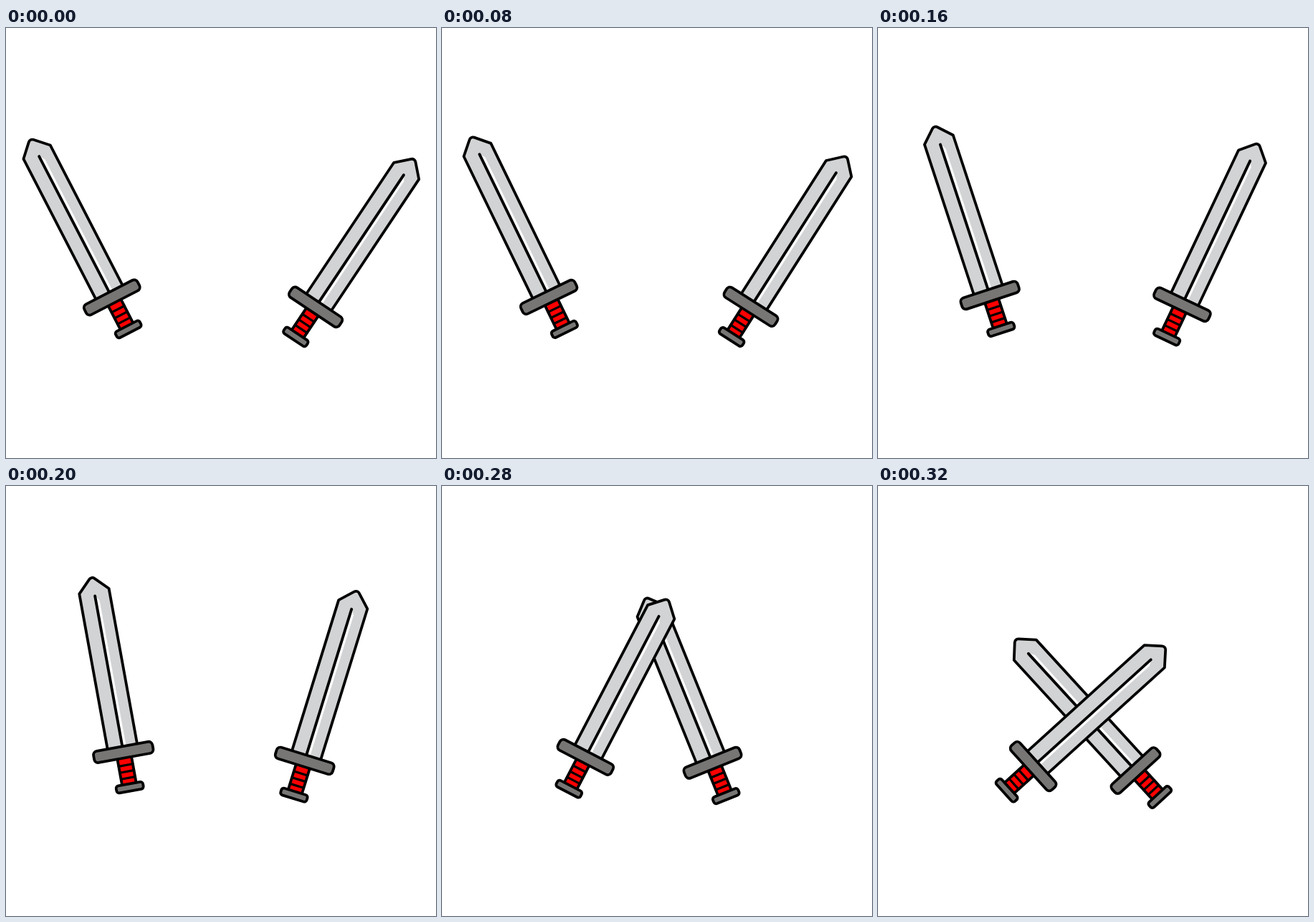
An HTML page with a canvas that plays this animation: 600 by 600 pixels, repeating every 1280 ms.

```html
<!DOCTYPE html>
<html lang="en">
<head>
<meta charset="utf-8">
<title>Crossing swords</title>
<style>
html, body { margin: 0; width: 100%; height: 100%; overflow: hidden; background: #fff; }
canvas { display: block; }
</style>
</head>
<body>
<canvas id="stage" width="600" height="600"></canvas>
<script>
const ctx = document.getElementById('stage').getContext('2d');
const LOOP = 1280, STEP = 40, HOLD = 40;

// Angles in degrees per step; the pommel drifts as the sword turns.
const rightSword = {
  angles: [33.7, 32.5, 29.6, 25.3, 17.2, 0.9, -22, -42.5],
  from: [404.3, 431], to: [393.3, 434]
};
const leftSword = {
  angles: [-27.3, -25.9, -23, -18.2, -10.3, 5.7, 27.5, 47.8],
  from: [170.7, 420.4], to: [179.6, 424.7]
};

function paint(fill, width = 3.8) {
  ctx.fillStyle = fill;
  ctx.fill();
  ctx.lineWidth = width;
  ctx.stroke();
}

function bar(halfWidth, top, height, radius, fill) {
  ctx.beginPath();
  ctx.roundRect(-halfWidth, top, halfWidth * 2, height, radius);
  paint(fill);
}

function line(x1, y1, x2, y2, width) {
  ctx.beginPath();
  ctx.moveTo(x1, y1);
  ctx.lineTo(x2, y2);
  ctx.lineWidth = width;
  ctx.stroke();
}

function blade() {
  ctx.beginPath();
  ctx.moveTo(-21, -50);
  ctx.lineTo(-21, -278.3);
  ctx.arcTo(0, -299.5, 21, -278.3, 5);
  ctx.lineTo(21, -278.3);
  ctx.lineTo(21, -50);
  paint('#d1d3d4');

  ctx.beginPath();
  ctx.moveTo(1, -271);
  ctx.lineTo(5.3, -264);
  ctx.lineTo(5.3, -50);
  ctx.lineTo(1, -50);
  ctx.fillStyle = '#fff';
  ctx.fill();
  line(0, -271.5, 0, -50, 3.9);
}

function hilt() {
  bar(10, -44, 40, 0, '#f00');
  for (let y = -31.6; y < -10; y += 9.1) line(-10, y, 10, y, 3.2);
  bar(19, -5, 10, 3.5, '#777675');
  bar(41.8, -58.2, 16.4, 5.5, '#777675');
}

function drawSword({ angles, from, to }, step) {
  const angle = angles[step];
  const p = (angle - angles[0]) / (angles[7] - angles[0]);
  ctx.save();
  ctx.translate(from[0] + (to[0] - from[0]) * p, from[1] + (to[1] - from[1]) * p * p);
  ctx.rotate(angle * Math.PI / 180);
  blade();
  hilt();
  ctx.restore();
}

function render(time) {
  const step = Math.min(7, Math.max(0, Math.floor((time - HOLD) / STEP)));
  ctx.fillStyle = '#fff';
  ctx.fillRect(0, 0, 600, 600);
  ctx.strokeStyle = '#000';
  ctx.lineCap = ctx.lineJoin = 'round';
  drawSword(rightSword, step);
  drawSword(leftSword, step);
}

const start = performance.now();
function tick() {
  render((performance.now() - start) % LOOP);
  requestAnimationFrame(tick);
}
tick();
</script>
</body>
</html>
```
